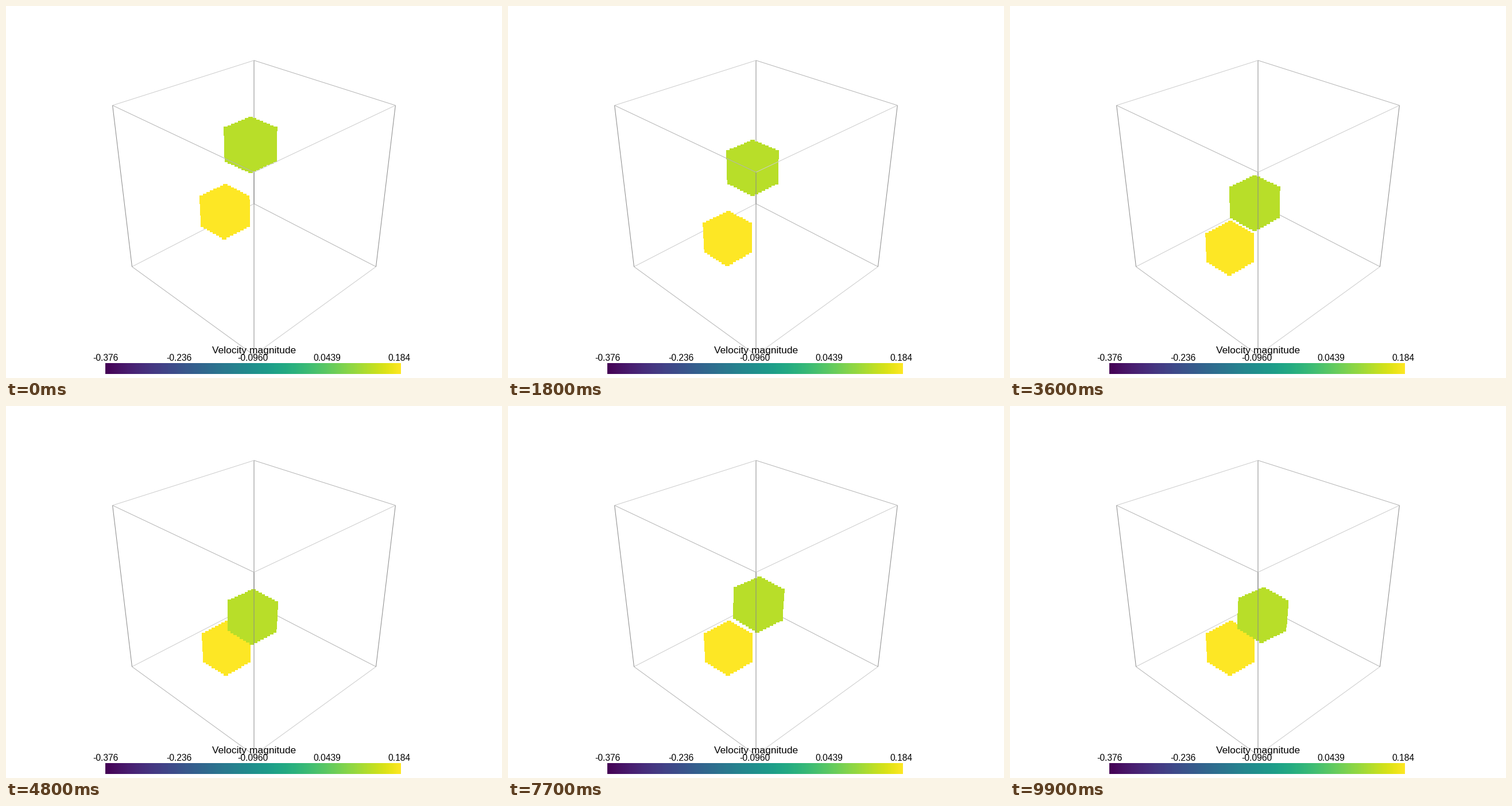
A matplotlib script that plays this animation: 864 by 648 pixels, repeating every 10 s.

```python
import itertools
import numpy as np
import matplotlib.pyplot as plt
from matplotlib.animation import FuncAnimation
from matplotlib.collections import LineCollection, PolyCollection

W, H, DPI = 864, 648, 100
FRAMES, STEP = 100, 100
PX = 72 / DPI

# camera: 30 degrees above the horizon, looking along a diagonal of the unit box
DIST, FOCAL = 3.381, 1091
COS, SIN = np.cos(np.pi / 6), np.sin(np.pi / 6)

GRAVITY = 0.0249
POINT = 8
SIDE = 0.171
COUNT = 8


def project(side, near, up):
    """Screen position of points given as sideways, towards camera, up."""
    depth = DIST - near * COS - up * SIN
    x = W / 2 + FOCAL * side / depth
    y = H / 2 - FOCAL * (up * COS - near * SIN) / depth
    return np.stack([x, y], axis=-1)


def diagonal(x, y):
    return (x - y) / np.sqrt(2), (x + y) / np.sqrt(2)


axis = np.linspace(-SIDE / 2, SIDE / 2, COUNT)
gx, gy, gz = (g.ravel() for g in np.meshgrid(axis, axis, axis))
LAT_SIDE, LAT_NEAR = diagonal(gx, gy)
SQUARE = np.array([[0, 0], [1, 0], [1, 1], [0, 1]]) * POINT


def block(side, near, up, roll=0.0):
    """Squares for the points of one cube at the given pose."""
    pts = project(LAT_SIDE + side, LAT_NEAR + near, gz + up)
    mid = project(side, near, up)
    c, s = np.cos(roll), np.sin(roll)
    pts = (pts - mid) @ np.array([[c, s], [-s, c]]) + mid
    corner = np.round(pts - POINT / 2)
    return corner[:, None, :] + SQUARE


def hermite(t, t0, z0, v0, t1, z1, v1):
    d = t1 - t0
    u = (t - t0) / d
    return ((2 * u**3 - 3 * u**2 + 1) * z0 + (u**3 - 2 * u**2 + u) * d * v0
            + (3 * u**2 - 2 * u**3) * z1 + (u**3 - u**2) * d * v1)


def fall(t):
    return 0.327 - 0.0495 * t - GRAVITY / 2 * t**2, -0.0495 - GRAVITY * t


def hop(t):
    return -0.0185 - GRAVITY / 2 * (t - 7.2)**2, -GRAVITY * (t - 7.2)


def green_height(t):
    if t <= 4.1:
        return fall(t)[0]
    if t <= 4.8:
        return hermite(t, 4.1, *fall(4.1), 4.8, -0.0984, 0.09)
    if t <= 5.2:
        return hermite(t, 4.8, -0.0984, 0.09, 5.2, *hop(5.2))
    if t <= 9.3:
        return hop(t)[0]
    return hermite(t, 9.3, *hop(9.3), 9.9, -0.0875, 0)


def green_block(t):
    side = np.interp(t, [4.2, 4.8, 5.5, 6.1, 7.7, 9.9],
                     [-0.0173, -0.008, 0, 0.0046, 0.013, 0.0245])
    roll = np.interp(t, [4.2, 4.8, 6.1, 7.7, 9.3, 9.9],
                     [0, 0.035, 0.037, 0.042, 0.046, 0.056])
    return block(side, 0.0907, green_height(t), roll)


def yellow_block(t):
    up = max(-0.0812 - 0.0739 * t - GRAVITY / 2 * t**2, -0.32)
    side = np.interp(t, [4.2, 4.8], [-0.156, -0.153])
    return block(side, 0.066, up)


fig = plt.figure(figsize=(W / DPI, H / DPI), dpi=DPI, facecolor="white")
ax = fig.add_axes([0, 0, 1, 1])
ax.axis("off")


def add_box():
    shades = ["#b4b4b4", "#cccccc", "#8a8a8a"]
    corners = list(itertools.product([-0.5, 0.5], repeat=3))
    for a, b in itertools.combinations(corners, 2):
        diff = [i for i in range(3) if a[i] != b[i]]
        if len(diff) != 1:
            continue
        k = diff[0]
        ends = np.array([a, b])
        line = project(*diagonal(ends[:, 0], ends[:, 1]), ends[:, 2])
        # edges on the near side lie over the cubes
        front = max(a[:2]) > 0 if k == 2 else a[1 - k] > 0
        ax.add_collection(LineCollection([line], colors=shades[k],
                                         linewidths=PX, snap=False,
                                         zorder=4 if front else 1))


def add_bar():
    ax.imshow(np.linspace(0, 1, 256)[None, :], cmap="viridis", aspect="auto",
              extent=[173, 688, 641, 622], interpolation="nearest", zorder=5)
    style = dict(ha="center", va="baseline", color="black",
                 family="Liberation Sans", zorder=6)
    ax.text(432.5, 605, "Velocity magnitude", fontsize=17.4 * PX, **style)
    labels = ["-0.376", "-0.236", "-0.0960", "0.0439", "0.184"]
    for x, label in zip([173.5, 301.5, 430, 559, 685], labels):
        ax.text(x, 617.5, label, fontsize=15.6 * PX, **style)


add_box()
add_bar()
ax.set_xlim(0, W)
ax.set_ylim(H, 0)

cubes = []
for color, z in (("#fde725", 2), ("#b8de29", 3)):
    cube = PolyCollection([SQUARE], facecolors=color, edgecolors="none",
                          linewidths=0, antialiaseds=False, zorder=z)
    ax.add_collection(cube, autolim=False)
    cubes.append(cube)


def update(i):
    t = i * STEP / 1000
    cubes[0].set_verts(yellow_block(t))
    cubes[1].set_verts(green_block(t))
    return cubes


anim = FuncAnimation(fig, update, frames=FRAMES, interval=STEP,
                     init_func=lambda: update(0), repeat=True, repeat_delay=0)
plt.show()
```
